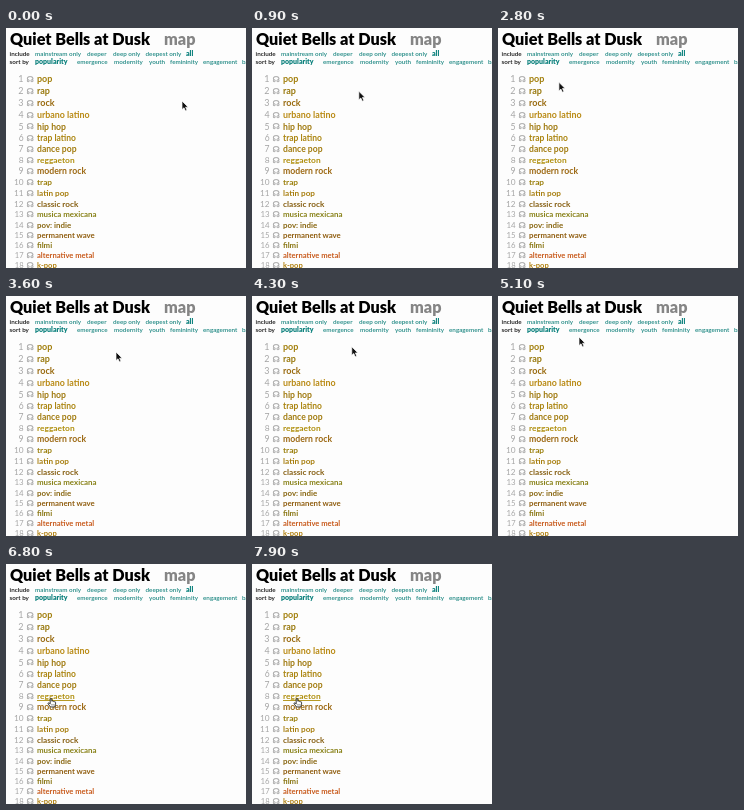
These frames come from a looping animation (240x240 px, 8000 ms). An HTML page:

```html
<!DOCTYPE html>
<html lang="en">
<head>
<meta charset="utf-8">
<title>Genre list</title>
<style>
  html, body { margin: 0; width: 100%; height: 100%; overflow: hidden; background: #fdfdfd; }
  svg { display: block; width: 100vw; height: 100vh; font-family: Lato, "Open Sans", sans-serif; }
  .title { font-size: 16.2px; font-weight: 900; }
  .menu { font-size: 6.3px; font-weight: 600; }
  .on { font-size: 7px; font-weight: 900; }
  .genre { font-weight: 700; }
  .mark { font: 8px "DejaVu Sans", sans-serif; stroke: #a4a4a4; stroke-width: .25px; }
</style>
</head>
<body>
<svg id="stage" viewBox="0 0 240 240">
  <g id="page"></g>
  <path id="line" fill="none" stroke-width=".9"/>
  <g id="arrow">
    <path d="M0 0V8.6L2 6.8L3.5 10L5 9.3L3.6 6.2H6.2Z" fill="#111" stroke="#fff" stroke-width=".7"/>
  </g>
  <g id="hand">
    <path d="M-.9 .6Q0 -.6 .9 .6V3.2Q1.8 2.5 2.5 3.5Q3.4 2.9 4 3.9Q5 3.5 5.1 4.8V6.7L4.2 9.6H-.6L-3.3 6Q-3.3 4.7 -2.2 5.1L-.9 6.2Z"
      fill="#fff" stroke="#111" stroke-width=".9" stroke-linejoin="round"/>
    <path d="M.8 6.3V8M2.2 6.3V8M3.5 6.3V8" stroke="#333" stroke-width=".5"/>
  </g>
</svg>
<script>
const LOOP = 8000;
const $ = id => document.getElementById(id);
const page = $("page"), line = $("line"), arrow = $("arrow"), hand = $("hand");

function text(str, x, y, fill, attrs = {}) {
  const el = document.createElementNS("http://www.w3.org/2000/svg", "text");
  el.textContent = str;
  for (const [k, v] of Object.entries({ x, y, fill, ...attrs })) el.setAttribute(k, v);
  page.appendChild(el);
  return el;
}

function menu(y, label, active, items) {
  text(label, 3.6, y, "#111", { class: "menu" });
  for (const [str, x] of items) {
    const on = str === active;
    text(str, x, y, on ? "#087f7b" : "#1f8883", { class: on ? "menu on" : "menu" });
  }
}

text("Quiet Bells at Dusk", 4, 17, "#000", { class: "title" });
text("map", 158, 17, "#858585", { class: "title" });
menu(28.2, "include", "all", [["mainstream only", 29], ["deeper", 81],
  ["deep only", 107], ["deepest only", 139.5], ["all", 180]]);
menu(36.2, "sort by", "popularity", [["popularity", 29], ["emergence", 71],
  ["modernity", 108], ["youth", 143], ["femininity", 164],
  ["engagement", 197], ["background", 236]]);

// name, colour, baseline, size
const genres = [
  ["pop", "#a27f0c", 54.2, 9], ["rap", "#98780c", 66.2, 9],
  ["rock", "#996b10", 78, 9], ["urbano latino", "#b98a14", 89.9, 8.9],
  ["hip hop", "#a07a10", 101.6, 8.7], ["trap latino", "#ab8510", 113, 8.5],
  ["dance pop", "#a27c10", 124.2, 8.6], ["reggaeton", "#af8e0c", 135.2, 8.4],
  ["modern rock", "#9c6812", 146.2, 8.7], ["trap", "#9c800e", 157.1, 8.3],
  ["latin pop", "#a87f10", 168, 8.2], ["classic rock", "#855e10", 178.8, 8.2],
  ["musica mexicana", "#878016", 189.4, 7.9], ["pov: indie", "#886610", 199.8, 7.9],
  ["permanent wave", "#905e10", 210.2, 7.8], ["filmi", "#887410", 220.3, 7.8],
  ["alternative metal", "#c85a1c", 230.4, 7.6], ["k-pop", "#b08010", 240.4, 7.6]
];

const links = genres.map(([name, color, y, size], i) => {
  text(i + 1, 17.6, y, "#a6a6a6", { "font-size": size });
  page.lastChild.setAttribute("text-anchor", "end");
  text("\u260A", 20.5, y - .2, "#a4a4a4", { class: "mark" });
  const el = text(name, 31, y, color, { class: "genre", "font-size": size });
  return { el, color, y };
});

// time, x, y of the pointer tip
const path = [
  [0, 176, 73], [300, 176, 73], [1500, 38, 53.5], [2500, 38, 53.5],
  [3300, 110, 56], [3900, 110, 56], [4900, 81, 41], [5150, 81, 41],
  [5650, 42.5, 86.3], [6050, 42.5, 86.3], [6500, 45, 134.3], [LOOP, 45, 134.3]
];

function pointer(t) {
  const i = path.findIndex(p => p[0] > t);
  const [t0, x0, y0] = path[i - 1], [t1, x1, y1] = path[i];
  const u = (t - t0) / (t1 - t0), e = u * u * (3 - 2 * u);
  return [x0 + (x1 - x0) * e, y0 + (y1 - y0) * e];
}

function draw(t) {
  const [x, y] = pointer(t);
  const hit = links.find(l => Math.abs(y - l.y + 3) < 5.6 &&
    x >= 31 && x <= 31 + l.el.getComputedTextLength());
  if (hit) {
    line.setAttribute("d", `M31 ${hit.y + 1.3}h${hit.el.getComputedTextLength()}`);
    line.setAttribute("stroke", hit.color);
  }
  line.style.display = hand.style.display = hit ? "" : "none";
  arrow.style.display = hit ? "none" : "";
  const scale = hit ? .9 : 1;
  (hit ? hand : arrow).setAttribute("transform", `translate(${x} ${y}) scale(${scale})`);
}

const start = performance.now();
function tick() {
  draw((performance.now() - start) % LOOP);
  requestAnimationFrame(tick);
}
tick();
</script>
</body>
</html>
```
